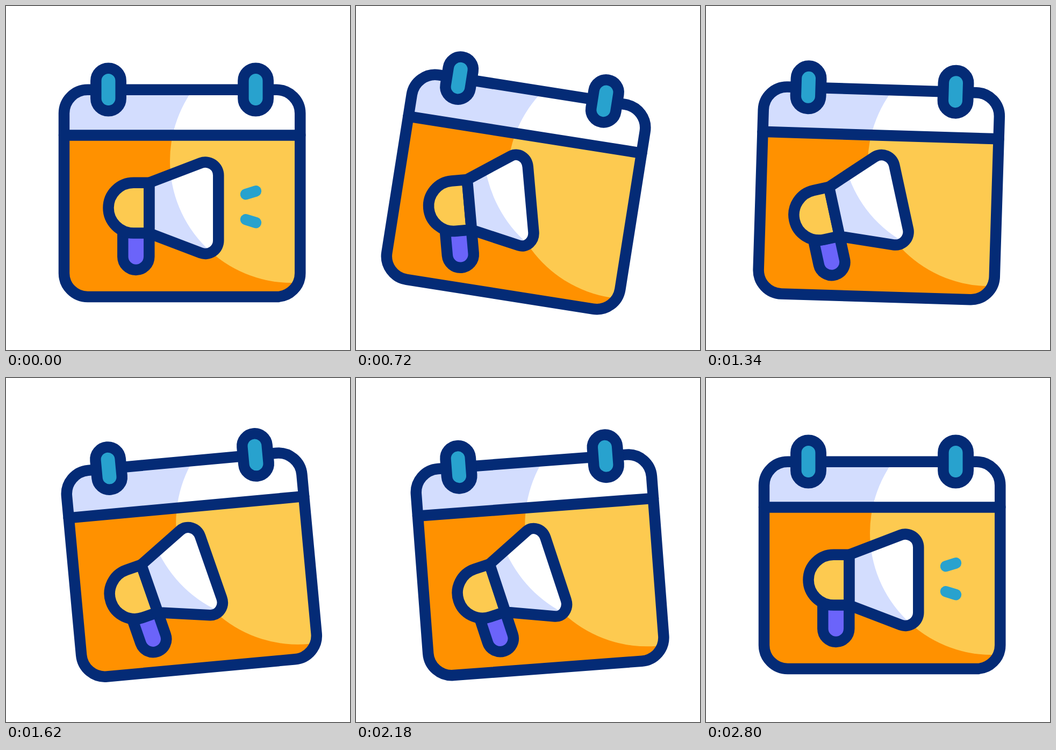
An HTML page for the animation above (2.82 s loop, 640x640 px).

```html
<!DOCTYPE html>
<html lang="en">
<head>
<meta charset="utf-8">
<title>Calendar announcement</title>
<style>
  html, body { margin: 0; width: 100%; height: 100%; overflow: hidden; background: #fff; }
  svg { display: block; width: 640px; height: 640px; }
  .ink { stroke: #042b76; stroke-width: 20.5; stroke-linecap: round; stroke-linejoin: round; }
  .pale { fill: #d3ddfe; }
  .white { fill: #fff; }
  .orange { fill: #ff9100; }
  .yellow { fill: #fdca50; }
  .teal { fill: #28a2ce; }
  .violet { fill: #6b64fa; }
  .none { fill: none; }
  #rays { stroke: #28a2ce; stroke-width: 20.5; stroke-linecap: round; }
</style>
</head>
<body>
<svg viewBox="0 0 640 640">
  <defs>
    <rect id="page" x="108" y="155.8" width="439.3" height="385.2" rx="44"/>
    <path id="horn" d="M266.5 328.7L362.3 292.1A24.5 24.5 0 0 1 395.3 315V436.5A24.5 24.5 0 0 1 362.3 459.4L266.5 422.8Z"/>
    <circle id="shine" cx="532" cy="288" r="227"/>
    <clipPath id="pageClip"><use href="#page"/></clipPath>
    <clipPath id="hornClip"><use href="#horn"/></clipPath>
    <clipPath id="headClip"><rect x="98" y="146" width="460" height="94.5"/></clipPath>
  </defs>
  <g id="calendar">
    <g clip-path="url(#pageClip)">
      <rect class="orange" x="98" y="146" width="460" height="406"/>
      <use href="#shine" class="yellow"/>
      <g clip-path="url(#headClip)">
        <rect class="pale" x="98" y="146" width="460" height="95"/>
        <use href="#shine" class="white"/>
      </g>
    </g>
    <use href="#page" class="ink none"/>
    <path class="ink" d="M108 240.6H547.3"/>
    <rect class="ink teal" x="167.3" y="115.8" width="46.4" height="79.4" rx="23.2"/>
    <rect class="ink teal" x="441.4" y="115.8" width="46.4" height="79.4" rx="23.2"/>
    <g id="megaphone">
      <path class="ink violet" d="M217.3 422V466.5A24.5 24.5 0 0 0 266.3 466.5V422Z"/>
      <path class="ink yellow" d="M266.5 328.8H237.3A46.8 46.8 0 0 0 237.3 422.4H266.5Z"/>
      <g id="cone">
        <g clip-path="url(#hornClip)">
          <use href="#horn" class="pale"/>
          <use href="#shine" class="white"/>
        </g>
        <path class="ink none" vector-effect="non-scaling-stroke" d="M266.5 328.7L362.3 292.1A24.5 24.5 0 0 1 395.3 315V436.5A24.5 24.5 0 0 1 362.3 459.4L266.5 422.8Z"/>
      </g>
      <g id="rays"><line id="rayA"/><line id="rayB"/></g>
    </g>
  </g>
</svg>
<script>
  const LOOP = 2820;
  const $ = id => document.getElementById(id);

  // Each track is a list of [time in ms, value]
  const tilt = [[0, 0], [900, 10], [1800, -7], [2700, 0]];
  const aim = [[0, 0], [400, -14], [2400, -14], [2800, 0]];
  const squash = [[400, 1], [1000, 0.8], [1400, 1], [2000, 0.8], [2400, 1]];
  const reach = [[0, 1], [400, 0], [2400, 0], [2800, 1]];
  const fade = [[300, 1], [400, 0], [2400, 0], [2500, 1]];

  const smooth = x => x * x * (3 - 2 * x);
  const linear = x => x;

  function at(track, t, ease = smooth) {
    if (t <= track[0][0]) return track[0][1];
    for (let i = 1; i < track.length; i++) {
      const [t0, a] = track[i - 1], [t1, b] = track[i];
      if (t < t1) return a + (b - a) * ease((t - t0) / (t1 - t0));
    }
    return track[track.length - 1][1];
  }

  function setRay(el, y, dy, len) {
    const pos = { x1: 446, y1: y, x2: 446 + 19 * len + 0.01, y2: y + dy * len };
    for (const k in pos) el.setAttribute(k, pos[k]);
  }

  function draw(t) {
    $("calendar").setAttribute("transform", `rotate(${at(tilt, t)} 327.6 155.5)`);
    $("megaphone").setAttribute("transform", `rotate(${at(aim, t)} 295 464.9)`);
    $("cone").setAttribute("transform",
      `translate(266.5 0) scale(${at(squash, t)} 1) translate(-266.5 0)`);
    const len = at(reach, t);
    setRay($("rayA"), 350.2, -5.8, len);
    setRay($("rayB"), 397.3, 5.8, len);
    $("rays").setAttribute("opacity", at(fade, t, linear));
  }

  const start = performance.now();
  function tick() {
    draw((performance.now() - start) % LOOP);
    requestAnimationFrame(tick);
  }
  draw(0);
  requestAnimationFrame(tick);
</script>
</body>
</html>
```
